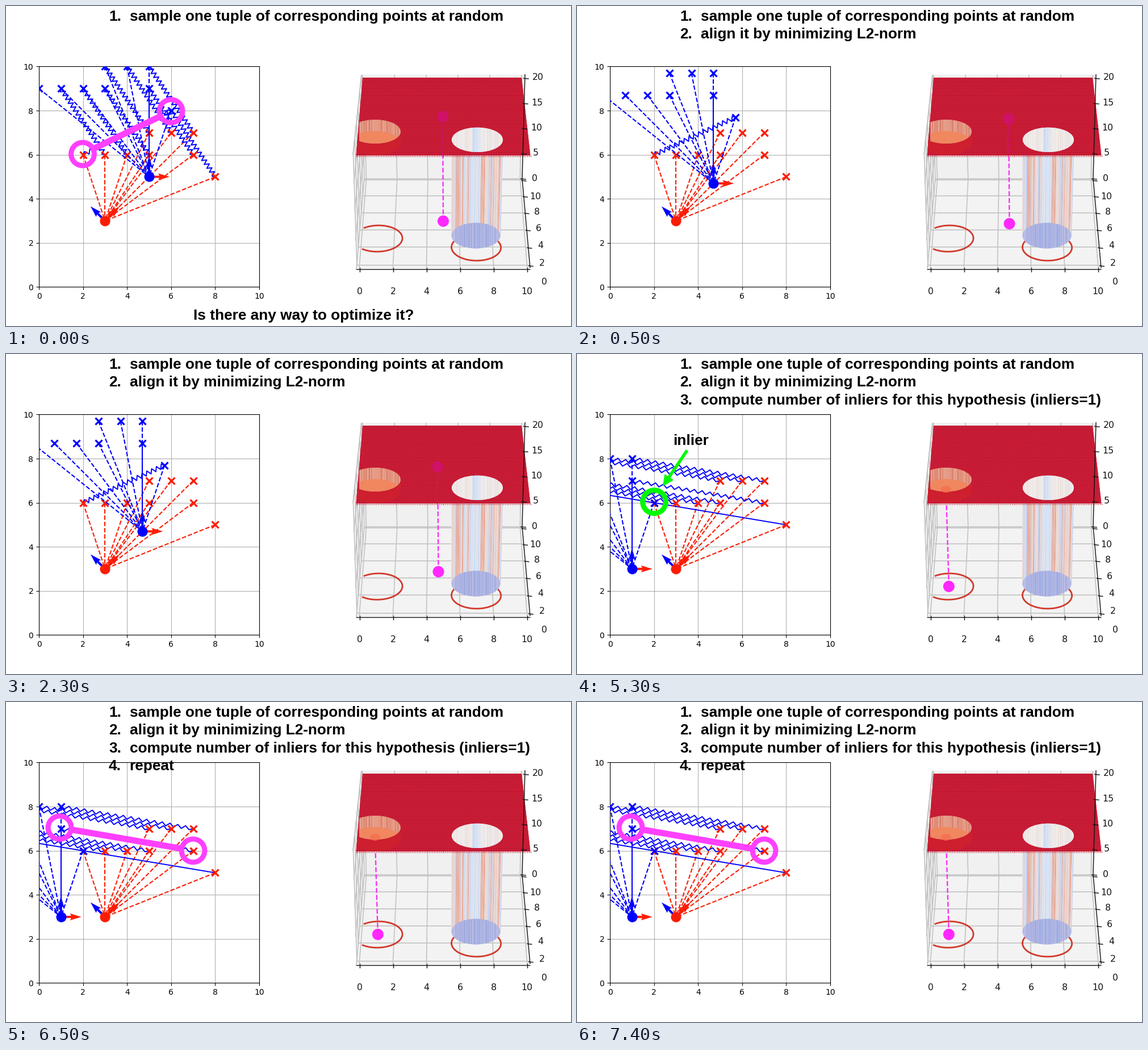
A matplotlib script for the animation above (8 s loop, 995 px wide and 563 px high).

```python
import numpy as np
import matplotlib.pyplot as plt
from matplotlib.animation import FuncAnimation
from matplotlib.collections import LineCollection
from matplotlib.patches import Circle, Ellipse, Polygon

W, H, DPI = 995, 563, 100
PT = 72 / DPI  # points per pixel
BLUE, RED, PINK = "#0000ff", "#fc1c04", "#ff40ff"
GREEN, BEAM, DIM = "#00f900", "#ff28ff", "#cf1268"
GRID = "#c2c2c2"
rng = np.random.default_rng(4)

# The small surplus keeps the pixel size from being rounded down
fig = plt.figure(figsize=((W + .01) / DPI, (H + .01) / DPI), dpi=DPI,
                 facecolor="white")
plot = fig.add_axes([58 / W, 68.5 / H, 388 / W, 388 / H])
plot.set(xlim=(0, 10), ylim=(0, 10))
plot.grid(True)
plot.set_axisbelow(True)

# Overlay in pixel coordinates, y pointing down
page = fig.add_axes([0, 0, 1, 1], zorder=5)
page.set(xlim=(0, W), ylim=(H, 0))
page.axis("off")


def line(pts, color, width, **kw):
    x, y = zip(*pts)
    return page.plot(x, y, color=color, lw=width * PT,
                     solid_capstyle="butt", **kw)[0]


def poly(pts, color, **kw):
    return page.add_patch(Polygon(pts, fc=color, ec="none", **kw))


def oval(x, y, rx, ry, color, **kw):
    return page.add_patch(Ellipse((x, y), 2 * rx, 2 * ry, fc=color, ec="none", **kw))


def strokes(segs, colors, width, clip=None, **kw):
    lc = page.add_collection(
        LineCollection(segs, colors=colors, linewidths=width * PT, **kw),
        autolim=False)
    if clip is not None:
        lc.set_clip_path(clip)
    return lc


def mix(a, b, t):
    return tuple(np.add(np.multiply(a, 1 - t), np.multiply(b, t)))


# ---------- 3D scene ----------

def floor(x, y):
    return 770 + (x - 5) * (29.5 - .24 * y), 456 - 16 * y + .1 * y * y


def roof(x, y):
    return 770 - .2 * y + (x - 5) * (30.7 - .27 * y), 263 - 13.7 * y


def draw_box():
    front_top, back_top = (611, 262), (626, 121)
    front_low, back_low = (617, 462), (631, 304)
    poly([front_low, (922, 462), (908, 304), back_low], "#f3f3f3", zorder=1)
    poly([back_low, (908, 304), (914, 121), back_top], "#f0f0f0", zorder=1)
    poly([front_top, front_low, back_low, back_top], "#f5f5f5", zorder=1)
    segs = [[back_low, (908, 304)], [front_top, back_top]]
    for v in range(0, 11, 2):
        t = v / 10
        segs.append([floor(v, -.3), floor(v, 10.1)])
        segs.append([floor(v, 10.1), (628 + 28 * v, 121)])
        segs.append([floor(-.15, v), floor(10.15, v)])
        segs.append([mix((618, 458), (631, 308), t), mix((611.5, 262), (626, 124), t)])
    for t in (0, .25, .5, .75, 1):
        segs.append([mix(front_low, front_top, t), mix(back_low, back_top, t)])
    strokes(segs, GRID, 1.6, zorder=2)

    axis = [[(616, 463.5), (923, 463.5)], [(923, 461), (909, 304)],
            [(914, 120), (909, 304)]]
    for i in range(6):
        x = floor(2 * i, 0)[0]
        axis.append([(x, 460), (x, 468)])
        x, y = floor(10.15, 2 * i)
        axis.append([(x - 2, y + 1), (x + 7, y + 2)])
    for i in range(5):
        x, y = 909 + 1.2 * i, 304 - 44.2 * i
        axis.append([(x - 3, y), (x + 7, y + 1)])
    strokes(axis, "#111111", 1.4, zorder=8)

    def label(x, y, n):
        page.text(x, y, str(n), fontsize=11.3, ha="center",
                  va="center_baseline", family="DejaVu Sans", color="#111111")

    for i in range(6):
        label(622.5 + 59 * i, 501, 2 * i)
        label(948 - 3.9 * i + .14 * i * i, 484 - 33.5 * i + .7 * i * i, 2 * i)
    for i in range(5):
        label(931 + 1.4 * i, 301.5 - 44.3 * i, 5 * i)


def ring_on_floor(cx, cy):
    a = np.linspace(-np.pi, np.pi, 200)
    x, y = cx + 1.5 * np.cos(a), cy + 1.5 * np.sin(a)
    px, py = floor(x, y)
    page.plot(np.where(x < .1, np.nan, px), py, color="#d2392b", lw=2.8 * PT, zorder=3)


def stripe(u):
    if abs(u + .04) < .17:
        return rng.choice(["#d3e0f5", "#c9d9f3", "#dde6f4", "#e6e6ec"])
    return rng.choice(["#e8a592", "#e2876f", "#efc9bc", "#e9dcd9",
                       "#c3cfec", "#e3e3ea", "#ecd5cd"])


def draw_shaft():
    u = np.linspace(-.99, .99, 84)
    bow = np.sqrt(1 - u ** 2)
    xt, xb = 830 + 45 * u, 827.5 + 43.5 * u
    yb = 404 + 20 * bow - rng.uniform(0, 12, u.size)
    top = [(785, 240), (875, 240)]
    poly(top + list(zip(xb[::-1], 402 + 20 * bow[::-1])), "#e9dfe0", zorder=4)
    colors = [stripe(v) for v in u]
    strokes([[(a, 240), (b, c)] for a, b, c in zip(xt, xb, yb)], colors, 1.2, zorder=4)
    base = oval(827.5, 404, 43, 22.5, "#a9b2e4", alpha=.92, zorder=5)
    shades = rng.choice(["#98a4dd", "#b4bae6", "#c3c2e2", "#a3aee3"], u.size)
    strokes([[(a, 380), (a, 428)] for a in xb], shades, 1, base, zorder=5, alpha=.7)

    # opening in the roof
    hole = oval(830, 235.4, 45, 21.6, "#f0e8e5", zorder=7)
    pale = ["#f3eeec", "#ece4e2", "#f0dcd5", "#f1ebe9", "#e8e6ea"]
    colors = [stripe(v) if abs(v + .04) < .17 else rng.choice(pale) for v in u]
    strokes([[(a, 212), (a, 258)] for a in xt], colors, 1.1, hole, zorder=7)


def draw_roof():
    quad = [roof(0, 0), roof(0, 10), roof(10, 10), roof(10, 0)]
    sheet = poly(quad, "#cc1b36", zorder=6)
    xs, ys = np.linspace(0, 10, 104), np.linspace(.1, 9.9, 44)
    strokes([[roof(x, 0), roof(x, 10)] for x in xs], "#b9102a", .9, sheet, zorder=6)
    strokes([[roof(0, y), roof(10, y)] for y in ys], "#df6a78", .7, sheet,
            zorder=6, linestyles=[(0, (1.1, 1.9))], alpha=.6)
    strokes([[roof(x, 0), (roof(x, 0)[0], 265)] for x in xs], "#c41a33", 1.2, zorder=6)

    # shallow well on the left
    cx, rx, ry = 650, 45, 21
    a = np.linspace(0, np.pi, 60)
    x, y = cx + rx * np.cos(a), ry * np.sin(a)
    wall = list(zip(x, 221 + y)) + list(zip(x[::-1], 241 + y[::-1]))
    poly(wall, "#cd1f2d", zorder=7).set_clip_path(sheet)
    u = np.linspace(cx - rx, cx + rx, 62)
    rim = Ellipse((cx, 221), 2 * rx, 2 * ry, transform=page.transData)
    inner = [(px, py) for px, py in zip(cx + rx * np.cos(2 * a),
                                        221 + ry * np.sin(2 * a)) if px > 621]
    hollow = poly(inner, "#e2917b", zorder=7)
    strokes([[(v, 199), (v, 243)] for v in u],
            rng.choice(["#e9a08a", "#d97f6c", "#e59682", "#e8ab99"], u.size),
            1, hollow, zorder=7)
    bottom = poly([p for p in inner if p[1] > 221] +
                  [(v, 241 - ry * np.sqrt(max(0, 1 - ((v - cx) / rx) ** 2)))
                   for v in np.linspace(622, 694, 40)], "#f0875f", zorder=7)
    bottom.set_clip_path(rim)


draw_box()
ring_on_floor(1, 3)
ring_on_floor(7, 2)
draw_shaft()
draw_roof()


# ---------- scan matching ----------

SCAN = [(-5, 4), (-4, 4), (-3, 4), (-2, 4), (-2, 5), (-1, 5), (0, 5), (0, 4), (1, 3)]
MAP = [(2, 6), (3, 6), (4, 6), (5, 6), (5, 7), (6, 7), (7, 7), (7, 6), (8, 5)]
TRUE_PAIRS = [(i, i) for i in range(1, 8)]
PICK = (8, 0)


def spring(p, q, coils=34, rest=8):
    """Zigzag of fixed wire length that flattens as it is stretched."""
    p, q = np.array(p, float), np.array(q, float)
    length = np.hypot(*(q - p))
    if length < 1e-6:
        return []
    d = (q - p) / length
    amp = np.sqrt(max(0, rest ** 2 - length ** 2)) / coils / 2
    side = amp * (-1.0) ** np.arange(coils + 1)
    side[[0, -1]] = 0
    pts = p + np.outer(np.linspace(0, length, coils + 1), d)
    pts += np.outer(side, (-d[1], d[0]))
    return plot.plot(*pts.T, color=BLUE, lw=1.4, zorder=4)


def robot(x, y, points, color, heads, z):
    art = []
    for px, py in points:
        art += plot.plot([px, x], [py, y], "--", color=color, lw=1.5, zorder=z)
    px, py = zip(*points)
    art += plot.plot(px, py, "x", color=color, ms=9, mew=2.3, zorder=z + 2)
    for u, v, c in heads:
        art.append(plot.quiver(x, y, u, v, color=c, units="dots", width=4,
                               scale=1, scale_units="dots", zorder=z + 3))
    art += plot.plot(x, y, "o", color=color, ms=13, mew=0, zorder=z + 4)
    return art


def beam(x, y):
    in_well = (x - 1) ** 2 + (y - 3) ** 2 < 2
    low, (tx, ty) = floor(x, y), roof(x, y)
    ty += 16 if in_well else 0
    art = [line([low, (tx, ty)], BEAM, 2.3, ls=(0, (3.7, 1.6)), zorder=5.5),
           oval(*low, 10, 10, BEAM, zorder=5.5)]
    if in_well:
        art.append(oval(tx, ty, 9, 6, "#f4704f", alpha=.8, zorder=9))
    else:
        art.append(line([(tx, ty), (tx, 264)], DIM, 2, ls=(0, (3.7, 1.6)), zorder=9))
        art.append(oval(tx, ty, 10, 10, DIM, zorder=9))
    return art


def ring(x, y, color):
    return page.add_patch(Circle((x, y), 20.4, fc="none", ec=color,
                                 lw=9 * PT, zorder=12))


def link(p, q):
    p, q = np.array(p), np.array(q)
    d = (q - p) / np.hypot(*(q - p))
    return [ring(*p, PINK), ring(*q, PINK),
            line([p + 22 * d, q - 22 * d], PINK, 11, zorder=12)]


def write(x, y, s):
    return page.text(x, y, s, fontsize=26.2 * PT, weight="bold",
                     family="Liberation Sans", va="baseline", zorder=15)


def inlier_mark():
    start, tip = np.array([194, 169.5]), np.array([151, 233])
    d = (tip - start) / np.hypot(*(tip - start))
    n = np.array([-d[1], d[0]])
    neck = tip - 20 * d
    return [ring(136, 260, GREEN), write(169, 159.5, "inlier"),
            line([start, neck + d], GREEN, 5.5, zorder=12),
            poly([tip, neck + 9.5 * n, neck - 9.5 * n], GREEN, zorder=12)]


STEPS = ["sample one tuple of corresponding points at random",
         "align it by minimizing L2-norm",
         "compute number of inliers for this hypothesis (inliers=1)",
         "repeat"]


def step(i):
    y = 25.6 + 31.5 * i
    return [write(181, y, f"{i + 1}."), write(217.5, y, STEPS[i])]


def scene(x, y, pairs):
    scan = [(x + dx, y + dy) for dx, dy in SCAN]
    art = robot(x, y, scan, BLUE, [(36, 0, RED), (0, 36, BLUE)], 5)
    for i, j in pairs:
        art += spring(scan[i], MAP[j])
    return art + beam(x, y)


robot(3, 3, MAP, RED, [(25.5, 25.5, RED), (-25.5, 25.5, BLUE)], 2.5)
step(0)
second, third, fourth = step(1), step(2), step(3)
sampled = (scene(5, 5, TRUE_PAIRS + [(8, 8), PICK])
           + link((135, 260.5), (290.5, 185))
           + [write(329.5, 552, "Is there any way to optimize it?")])
aligning = scene(4.7, 4.7, [PICK])
aligned = scene(1, 3, TRUE_PAIRS + [(0, 8), PICK])
marked = inlier_mark()
resampled = link((94.5, 221), (329.5, 261.5))

STAGES = [sampled,
          aligning + second,
          aligned + marked + second + third,
          aligned + resampled + second + third + fourth]
STARTS = [0, 500, 3500, 6500]
TICK, LOOP = 500, 8000
MOVABLE = [a for s in STAGES for a in s]


def show(frame):
    stage = sum(frame * TICK >= s for s in STARTS) - 1
    for a in MOVABLE:
        a.set_visible(False)
    for a in STAGES[stage]:
        a.set_visible(True)
    return []


anim = FuncAnimation(fig, show, frames=LOOP // TICK, interval=TICK,
                     init_func=lambda: show(0), repeat=True, repeat_delay=0)
plt.show()
```
